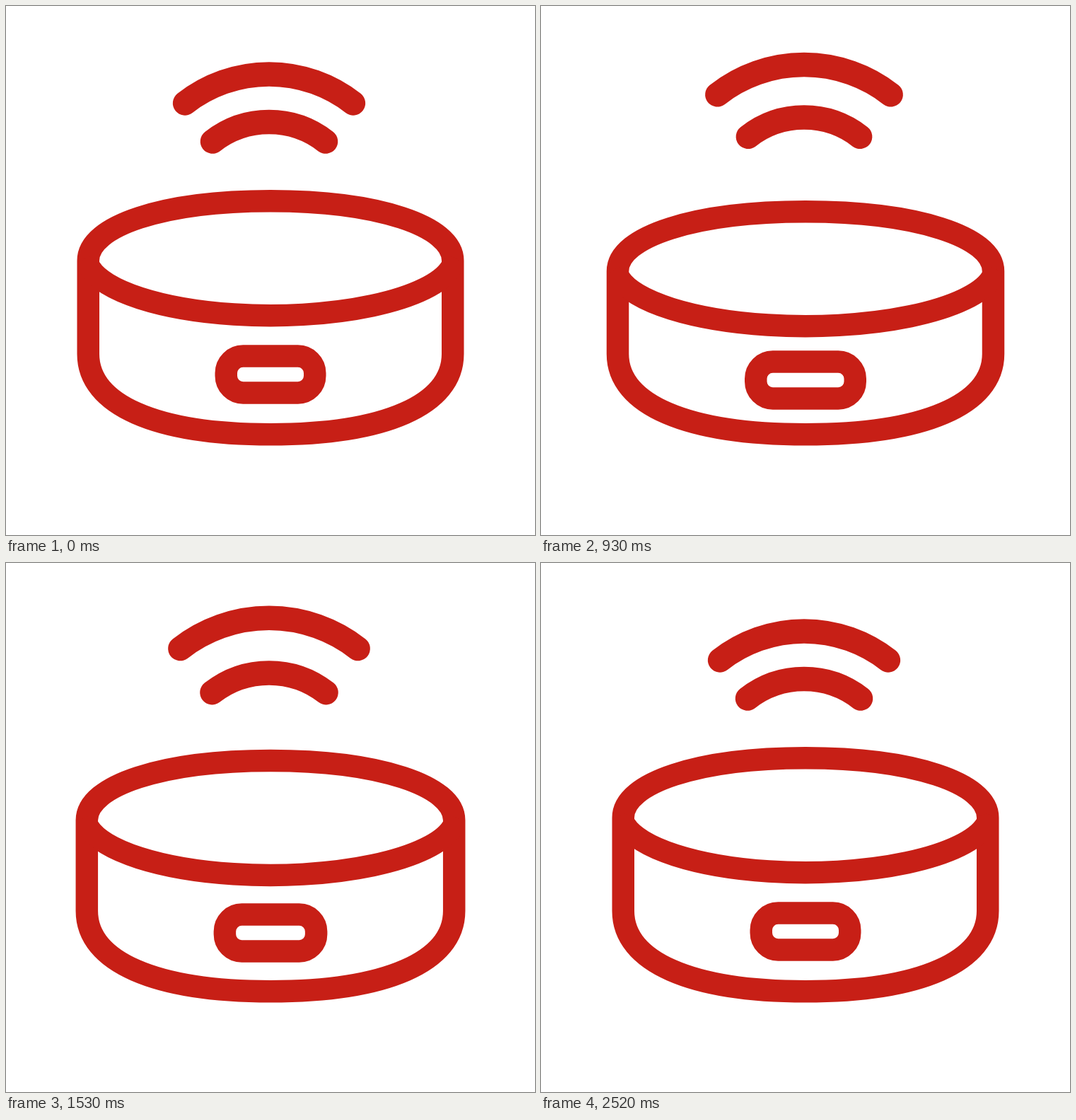
Animation, 748 px wide and 748 px high, one loop 2550 ms. Source, as an HTML page with a canvas:

```html
<!DOCTYPE html>
<html>
<head>
<meta charset="utf-8">
<style>
html, body { margin: 0; width: 100%; height: 100%; overflow: hidden; background: #fff; }
canvas { display: block; }
</style>
</head>
<body>
<canvas id="stage" width="748" height="748"></canvas>
<script>
const ctx = document.getElementById('stage').getContext('2d');
const LOOP = 2550, STEP = 30;
const COLOR = '#c71f16';
const BODY_LINE = 31.5, WAVE_LINE = 34.5;
const SPREAD = 0.663; // half opening angle of the waves

// Times in steps: three beats, then one swing back to rest
const START = 10, BEAT = 17, BEATS = 3, END = 84;
const SETTLE = START + BEAT * BEATS, SWING = 10, OVERSHOOT = 1.5;

const REST = { scale: 1, shift: 0 };
const OUTER = {
  top: 96.5, radius: 193.2, sag: 41, pause: 0.32,
  low: { scale: 0.891, shift: 13.7 },
  high: { scale: 1.345, shift: -72 }
};
const INNER = {
  top: 164, radius: 130, sag: 27.5, pause: 0.62,
  low: { scale: 0.756, shift: 18 },
  high: { scale: 1.145, shift: -23 }
};

const mix = (a, b, x) => a + (b - a) * x;
const blend = (a, b, x) => ({
  scale: mix(a.scale, b.scale, x),
  shift: mix(a.shift, b.shift, x)
});

function ease(step, from, to) {
  const x = Math.min(1, Math.max(0, (step - from) / (to - from)));
  return x * x * (3 - 2 * x);
}

// A beat rises to a short pause, jumps to the high pose and drops to the low one
function beatPose(wave, phase, base) {
  if (phase > 9.7) return blend(wave.high, wave.low, ease(phase, 9.7, BEAT));
  const lift = mix(wave.pause * ease(phase, 0, 4.5), 1, ease(phase, 6.5, 9.7));
  return blend(base, wave.high, lift);
}

function settlePose(wave, phase) {
  const swing = mix(-1, OVERSHOOT, ease(phase, 0, SWING));
  const decay = 1 - ease(phase, SWING, END - SETTLE);
  return blend(REST, wave.low, -swing * decay);
}

function wavePose(wave, step) {
  if (step <= START) return REST;
  if (step >= SETTLE) return settlePose(wave, step - SETTLE);
  const base = step < START + BEAT ? REST : wave.low;
  return beatPose(wave, (step - START) % BEAT, base);
}

function squash(step) {
  if (step < START || step >= SETTLE) return 0;
  return Math.max(0, 1 - Math.abs((step - START) % BEAT - 4) / 4);
}

function drawWave(wave, step) {
  const { scale, shift } = wavePose(wave, step);
  const radius = wave.radius * scale;
  const top = wave.top + shift - wave.sag * (scale - 1) / 2;
  ctx.beginPath();
  ctx.arc(372, top + radius, radius, -Math.PI / 2 - SPREAD, -Math.PI / 2 + SPREAD);
  ctx.stroke();
}

// Half of a rounded oval from (cx - rx, y) to (cx + rx, y); negative ry bulges upwards
function bulge(cx, y, rx, ry, fullness) {
  const hx = rx * fullness, hy = ry * fullness;
  ctx.moveTo(cx - rx, y);
  ctx.bezierCurveTo(cx - rx, y + hy, cx - hx, y + ry, cx, y + ry);
  ctx.bezierCurveTo(cx + hx, y + ry, cx + rx, y + hy, cx + rx, y);
}

function drawBody(amount) {
  const cx = 374, rx = 257.75 + 7.75 * amount, drop = 15 * amount;
  const rim = 360 + drop, corner = 492;

  ctx.beginPath();
  bulge(cx, rim, rx, -84.25, 0.585);
  ctx.lineTo(cx + rx, corner);
  bulge(cx, corner, rx, 113.75, 0.63);
  ctx.moveTo(cx - rx, corner);
  ctx.lineTo(cx - rx, rim);
  ctx.stroke();

  ctx.beginPath();
  ctx.ellipse(cx, 354 + drop, rx + 2.5, 83.7, 0, 0.2, Math.PI - 0.2);
  ctx.stroke();

  const width = 125.5 + 15 * amount;
  ctx.beginPath();
  ctx.roundRect(cx - width / 2, 495 + 8 * amount, width, 52, 24);
  ctx.stroke();
}

function draw(time) {
  const step = Math.floor((time % LOOP) / STEP);
  ctx.fillStyle = '#fff';
  ctx.fillRect(0, 0, 748, 748);
  ctx.strokeStyle = COLOR;
  ctx.lineCap = 'round';
  ctx.lineWidth = BODY_LINE;
  drawBody(squash(step));
  ctx.lineWidth = WAVE_LINE;
  drawWave(OUTER, step);
  drawWave(INNER, step);
}

const begin = performance.now();
function tick() {
  draw(performance.now() - begin);
  requestAnimationFrame(tick);
}
tick();
</script>
</body>
</html>
```
